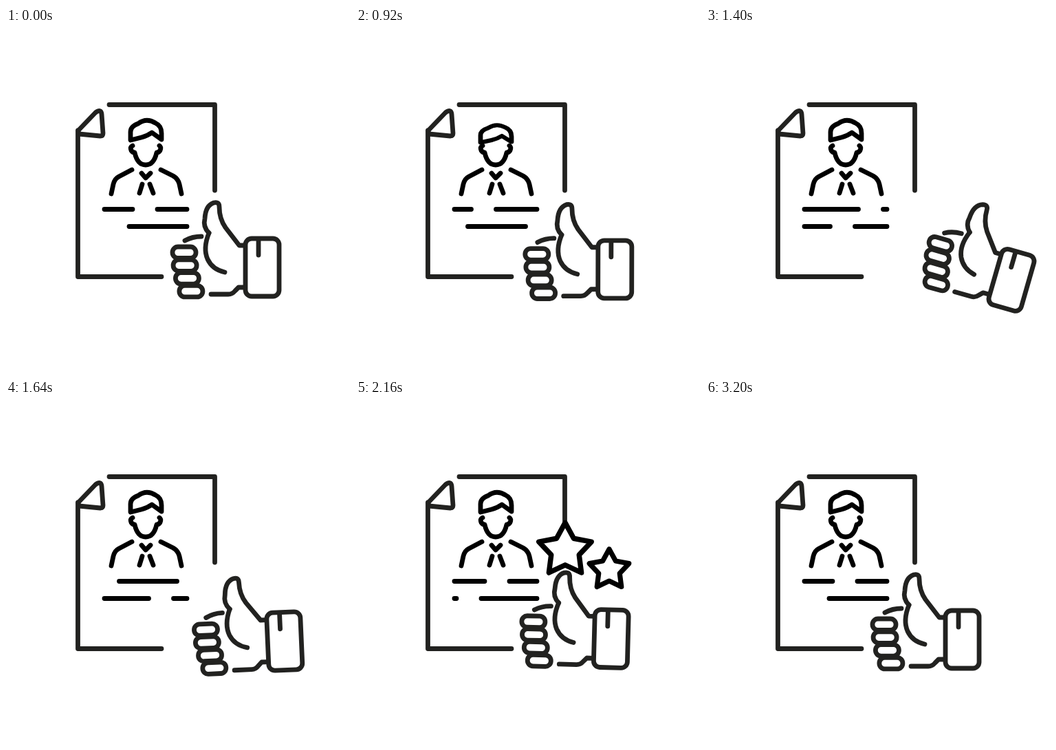
Animation, 500 px wide and 500 px high, one loop 3240 ms. Source, as an HTML page:

```html
<!DOCTYPE html>
<html lang="en">
<head>
<meta charset="utf-8">
<title>Approved résumé</title>
<style>
  html, body { margin: 0; width: 100%; height: 100%; overflow: hidden; background: #fff; }
  svg { display: block; width: 100%; height: 100%; }
  svg * { stroke-linecap: round; stroke-linejoin: round; }
  .gray { stroke: #222220; }
  .black { stroke: #000; }
  .solid { fill: #fff; }
</style>
</head>
<body>
<svg viewBox="0 0 500 500" fill="none" stroke-width="6.8">
  <g class="gray">
    <path d="M150 111.5H303.5V236M104.5 149V361.5H226"/>
    <path d="M105 149L130 123Q138 117 139 125L141 153Q141 157 137 157L106 154Z"/>
  </g>
  <g class="black">
    <path id="hair" d="M181 163V151Q181 143 192 139Q204 130 217 138Q226 142 226 153V162L212 152Q205 157 197 159Z"/>
    <path d="M184 171Q180 173 182 178Q184 181 187 181Q191 199 203 199Q215 199 219 181Q222 181 224 178Q226 173 223 171"/>
    <path d="M183 206L164 216Q158 219 156 227L153 241M225 206L243 215Q250 219 252 227L255 241"/>
    <path d="M197 211L203 218L210 211M198 227L194 240M209 227L214 240"/>
    <path id="line1" d="M143 263.5h120" stroke-dasharray="84 36"/>
    <path id="line2" d="M143 288.5h120" stroke-dasharray="84 36"/>
  </g>
  <g id="hand" class="gray">
    <path d="M295 298Q286 289 289 277Q290 258 302 254Q310 252 310 260Q310 277 319 290L339 316H348"/>
    <path d="M295 298Q286 320 293 336Q300 351 318 355M260 309Q271 303 284 303"/>
    <path d="M298 387H323Q329 387 333 382L338 377H348"/>
    <rect class="solid" x="348" y="306" width="49" height="84" rx="9"/>
    <path d="M367 308V330"/>
    <g id="fingers" class="solid"></g>
  </g>
  <g class="black solid">
    <path id="star1"/>
    <path id="star2"/>
  </g>
</svg>
<script>
const LOOP = 3240, CYCLE = 3200, STEP = 40;
const $ = id => document.getElementById(id);

// Eased 0 to 1 between two times.
function ease(t, from, to) {
  const u = Math.min(1, Math.max(0, (t - from) / (to - from)));
  return u * u * (3 - 2 * u);
}

// Springs from 0 past 1 and settles there.
function spring(t, from) {
  const s = t - from;
  return s < 0 ? 0 : 1 - Math.exp(-s / 230) * Math.cos(s * Math.PI / 400);
}

function starPath(radius) {
  const points = Array.from({ length: 10 }, (_, i) => {
    const r = i % 2 ? radius * 0.53 : radius;
    const a = (i / 5 - 0.5) * Math.PI;
    return `${r * Math.cos(a)} ${r * Math.sin(a)}`;
  });
  return `M${points.join("L")}Z`;
}

function drawFingers() {
  const finger = i =>
    `<rect x="${242 + 1.1 * i * i}" y="${318 + 18.8 * i}" width="34" height="16.5" rx="8"/>`;
  $("fingers").innerHTML = [0, 1, 2, 3].map(finger).join("");
}

function drawLine(id, t, offset) {
  $(id).setAttribute("stroke-dashoffset", -((offset + t / CYCLE * 360) % 120));
}

function drawHair(t) {
  const dip = ease(t, 600, 920) - ease(t, 920, 1240);
  $("hair").setAttribute("transform",
    `translate(0 ${163 + 3.5 * dip}) scale(1 ${1 - 0.12 * dip}) translate(0 -163)`);
}

// Dips, swings out to the right, then overshoots back to rest.
function drawHand(t) {
  const x = 73 * ease(t, 840, 1420) - 81 * ease(t, 1440, 1840) + 8 * ease(t, 1840, 2300);
  const y = 68 * (ease(t, 890, 1140) - ease(t, 1140, 1440))
    + 7 * ease(t, 1500, 1720) - 9.5 * ease(t, 1840, 2080) + 2.5 * ease(t, 2160, 2400);
  const angle = 16 * ease(t, 900, 1300) - 25 * ease(t, 1400, 1760)
    + 10.5 * ease(t, 1840, 2160) - 1.5 * ease(t, 2160, 2400);
  $("hand").setAttribute("transform", `translate(${x} ${y}) rotate(${angle} 318 351)`);
}

function drawStar(id, t, x, y, start) {
  const scale = spring(t, start) * (1 - ease(t, 2860, 3120));
  $(id).style.display = scale > 0.01 ? "" : "none";
  $(id).setAttribute("transform", `translate(${x} ${y}) scale(${scale})`);
}

function draw(t) {
  drawLine("line1", t, 77);
  drawLine("line2", t, 36);
  drawHair(t);
  drawHand(t);
  drawStar("star1", t, 304, 218.5, 1680);
  drawStar("star2", t, 368, 247, 1640);
}

$("star1").setAttribute("d", starPath(36.5));
$("star2").setAttribute("d", starPath(28.5));
drawFingers();

const start = performance.now();
function tick() {
  const t = (performance.now() - start) % LOOP;
  draw(Math.floor(t / STEP) * STEP);
  requestAnimationFrame(tick);
}
draw(0);
requestAnimationFrame(tick);
</script>
</body>
</html>
```
